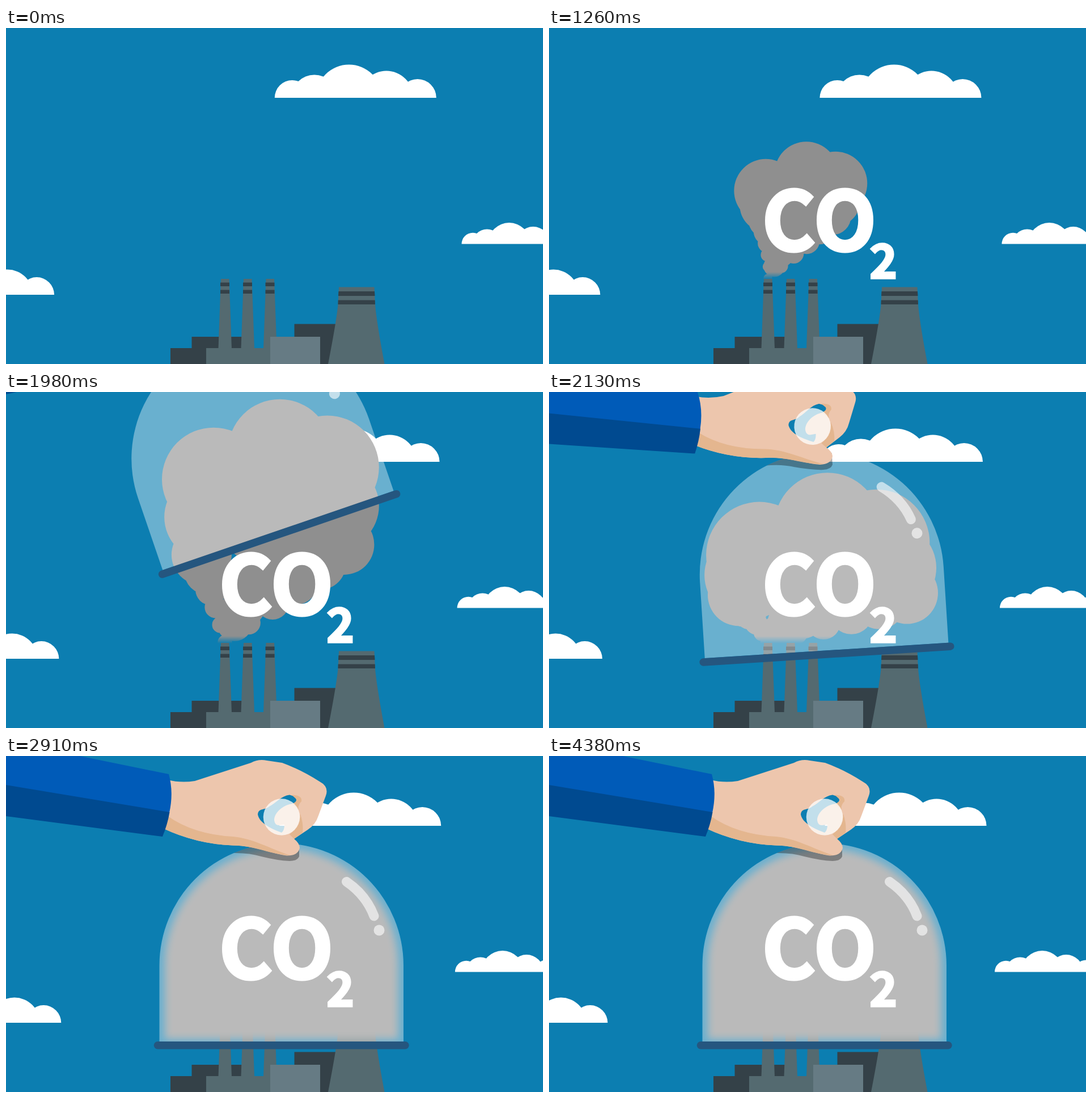
An HTML page that plays this animation: 947x592 px, repeating every 4410 ms.

```html
<!DOCTYPE html>
<html lang="en">
<head>
<meta charset="utf-8">
<title>Smoke under a glass bell</title>
<style>
  html, body { margin: 0; height: 100%; overflow: hidden; background: #0c7eb1; }
  svg { display: block; width: 100vw; height: 100vh; }
  text { font-family: "Noto Sans CJK SC", "Noto Sans CJK JP", sans-serif; font-weight: 700; fill: #fff; stroke: #fff; }
</style>
</head>
<body>
<svg viewBox="0 0 947 592">
  <defs>
    <path id="dome" d="M270.500 503V369a215.250 215.250 0 0 1 430.500 0V503z"/>
    <path id="cloud" fill="#fff"/>
    <g id="chimney">
      <path fill="#546a70" d="M379 442h14.500l1 26 3.500 97h-23.500l3.500-97z"/>
      <path fill="#344148" d="M378 448.500h16v6.500h-16zM378 461.500h16v6.500h-16z"/>
    </g>
    <linearGradient id="fade" x1="0" x2="0" y1="430" y2="443" gradientUnits="userSpaceOnUse">
      <stop stop-color="#fff"/><stop offset="1" stop-color="#fff" stop-opacity="0"/>
    </linearGradient>
    <filter id="soft"><feGaussianBlur stdDeviation="7"/></filter>
    <clipPath id="inside"><use href="#dome"/></clipPath>
    <mask id="open" maskUnits="userSpaceOnUse" x="0" y="0" width="947" height="592">
      <path fill="url(#fade)" d="M0 0h947v592H0z"/>
    </mask>
    <mask id="closed" maskUnits="userSpaceOnUse" x="0" y="0" width="947" height="592">
      <g clip-path="url(#inside)">
        <path filter="url(#soft)" fill="#fff" d="M280 499V369a205.750 205.750 0 0 1 411.500 0V499z"/>
      </g>
    </mask>
  </defs>

  <rect width="947" height="592" fill="#0c7eb1"/>
  <use id="cloudTop" href="#cloud"/>
  <use id="cloudRight" href="#cloud"/>
  <use id="cloudLeft" href="#cloud"/>

  <path fill="#344148" d="M290 564h64v28h-64zM327.500 544H420v21h-92.500zM508.500 521.500H590V592h-81.500z"/>
  <use href="#chimney"/>
  <use href="#chimney" x="40"/>
  <use href="#chimney" x="79.500"/>
  <path fill="#546a70" d="M353 564H467v28H353zM587 456.500h62.500L651 487Q653 515 667.500 592H568Q583 515 585.500 487z"/>
  <path fill="#667b84" d="M466 544h88v48h-88z"/>
  <path fill="#344148" d="M586.500 464h63.500l.5 8h-64.500zM585.700 479.500h65l.3 7.500h-65.500z"/>

  <g id="smoke" fill="#8f8f8f">
    <path id="puffs"/>
    <rect id="fog" x="260" y="140" width="450" height="370"/>
  </g>

  <g id="label">
    <text x="375.800 466.800" y="392.200" font-size="143.500" stroke-width="5">CO</text>
    <text x="565.200" y="441.200" font-size="82.500" stroke-width="3.500">2</text>
  </g>

  <g id="bell">
    <use href="#dome" fill="#fff" opacity=".385"/>
    <g fill="none" stroke="#fff" stroke-linecap="round" opacity=".6">
      <path stroke-width="17" d="M600.500 221.500Q635 245 649 282"/>
      <path stroke-width="19" d="M658 307h.01"/>
    </g>
    <path stroke="#25567f" stroke-width="13.500" stroke-linecap="round" d="M267.500 509.700H704"/>
    <path clip-path="url(#inside)" opacity=".33" d="M398 171L420 150H517V177Q514 185 500 185Q478 184 450 177Q428 170 398 171z"/>
    <path fill="#edc6ad" fill-rule="evenodd" d="M285 42Q308 48 333 44L432 12Q445 5 460 8L487 12Q520 24 553 45Q570 54 564 70L551 105Q546 121 532 130L508 146Q518 154 518 162Q515 176 495 175.500C468 172 440 158 400 157.500Q335 155 276 127z
      M444 103C445 91 457 96 464 89C476 83 486 70 500 68.500Q511 71 512 77Q512 82 506 84C488 86 473 100 473 113Q474 122 481 122L491 121Q491 131 486 135C470 129 447 119 444 103z"/>
    <g fill="#e4b68f">
      <path d="M284 105Q330 138 400 142C435 145 465 163 501 175C468 174 440 158 400 157.500Q335 155 276 127z"/>
      <path d="M508 146L523 135Q525 120 519 102Q518 124 500 138z"/>
      <path d="M504 68.500Q523 69 521 80Q514 87 516 95L505 84Q514 80 512 76z"/>
    </g>
    <circle cx="486" cy="107.500" r="32.300" fill="#fff" opacity=".75"/>
    <path fill="#005bb8" d="M-300-87L130 0L287 32Q296 64 288 100L-300 3z"/>
    <path fill="#004a90" d="M-300 1L288.500 99Q285 120 276 142L-300 67z"/>
  </g>
</svg>
<script>
const LOOP = 4410, LANDED = 2165;
const $ = id => document.getElementById(id);
const clamp = v => Math.max(0, Math.min(1, v));
const mix = (a, b, u) => a.map((v, i) => v + (b[i] - v) * u);
const move = (id, value) => $(id).setAttribute("transform", value);
const disc = ([x, y], r) => `M${x - r} ${y}a${r} ${r} 0 0 1 ${2 * r} 0a${r} ${r} 0 0 1 ${-2 * r} 0z`;

// Half discs: centre and radius along the flat base
const bumps = [[31, 31], [70, 40.5], [131, 58.5], [197, 47.5], [252, 33]];
$("cloud").setAttribute("d", bumps.map(([x, r]) => `M${x - r} 0a${r} ${r} 0 0 1 ${2 * r} 0z`).join(""));

// Smoke poses: time, size, then x and y of the crown, left foot and right foot
const VENT = [386, 441];
const poses = [
  [0, 0, ...VENT, ...VENT, ...VENT],
  [1260, .65, 446, 272, 384, 338, 500, 332],
  [1740, 1, 478, 172, 378, 278, 570, 258],
  [1980, 1.06, 470, 128, 345, 286, 596, 268],
  [2340, 1.1, 480, 295, 332, 375, 640, 375]
];

function smokePose(t) {
  const next = poses.findIndex(p => p[0] > t);
  if (next < 0) return poses.at(-1);
  const from = poses[next - 1], to = poses[next];
  let u = (t - from[0]) / (to[0] - from[0]);
  if (next === 1) u **= 1.5;
  if (next === 4) u = 1 - (1 - u) ** 3;
  return mix(from, to, u);
}

// Three crown lobes, shoulders below them, and three strands of puffs down to the vent
function smokePath(t) {
  const [, size, x, y, lx, ly, rx, ry] = smokePose(t);
  const crown = [x, y], left = [lx, ly], right = [rx, ry], middle = mix(left, right, .5);
  const lobe = (dx, dy) => [x + dx * size, y + dy * size];
  const lobes = [lobe(-98, 23), lobe(12, -24), lobe(91, 3)];
  let d = lobes.map(p => disc(p, 86 * size)).join("");
  d += disc(mix(lobes[0], left, .5), 72 * size) + disc(mix(lobes[2], right, .5), 72 * size);
  d += disc(mix(crown, middle, .5), 100 * size);
  for (const [end, power] of [[left, 2], [middle, .5], [right, 1]])
    for (let k = 0; k <= 5; k++)
      d += disc(mix(VENT, end, k / 5), (12 + 38 * (k / 5) ** power) * size);
  return d;
}

function drawSmoke(t) {
  $("puffs").setAttribute("d", smokePath(t));
  $("smoke").setAttribute("mask", t < LANDED ? "url(#open)" : "url(#closed)");
  $("fog").setAttribute("opacity", clamp((t - LANDED) / 390));
}

// Parabola through the values at 1740, 1980 and LANDED
function curve(t, a, b, c) {
  const p = 1740, q = 1980, r = LANDED;
  return a * (t - q) * (t - r) / ((p - q) * (p - r))
       + b * (t - p) * (t - r) / ((q - p) * (q - r))
       + c * (t - p) * (t - q) / ((r - p) * (r - q));
}

function drawBell(t) {
  $("bell").setAttribute("visibility", t < 1650 ? "hidden" : "visible");
  const s = Math.min(t, LANDED);
  const x = curve(s, 222, 275, 267), y = curve(s, 52, 320, 509.5), angle = curve(s, -40.5, -19, 0);
  move("bell", `translate(${x} ${y}) rotate(${angle}) translate(-267 -509.5)`);
}

function draw(now) {
  const t = now % LOOP;
  move("cloudTop", `translate(${473.8 + t * .0029} 123)`);
  move("cloudRight", `translate(${803.5 - t * .004} 380.5) scale(.64)`);
  move("cloudLeft", `translate(${-182 + t * .0042} 470) scale(.937)`);
  drawSmoke(t);
  $("label").setAttribute("opacity", clamp((t - 600) / 300));
  drawBell(t);
  requestAnimationFrame(draw);
}
requestAnimationFrame(draw);
</script>
</body>
</html>
```
